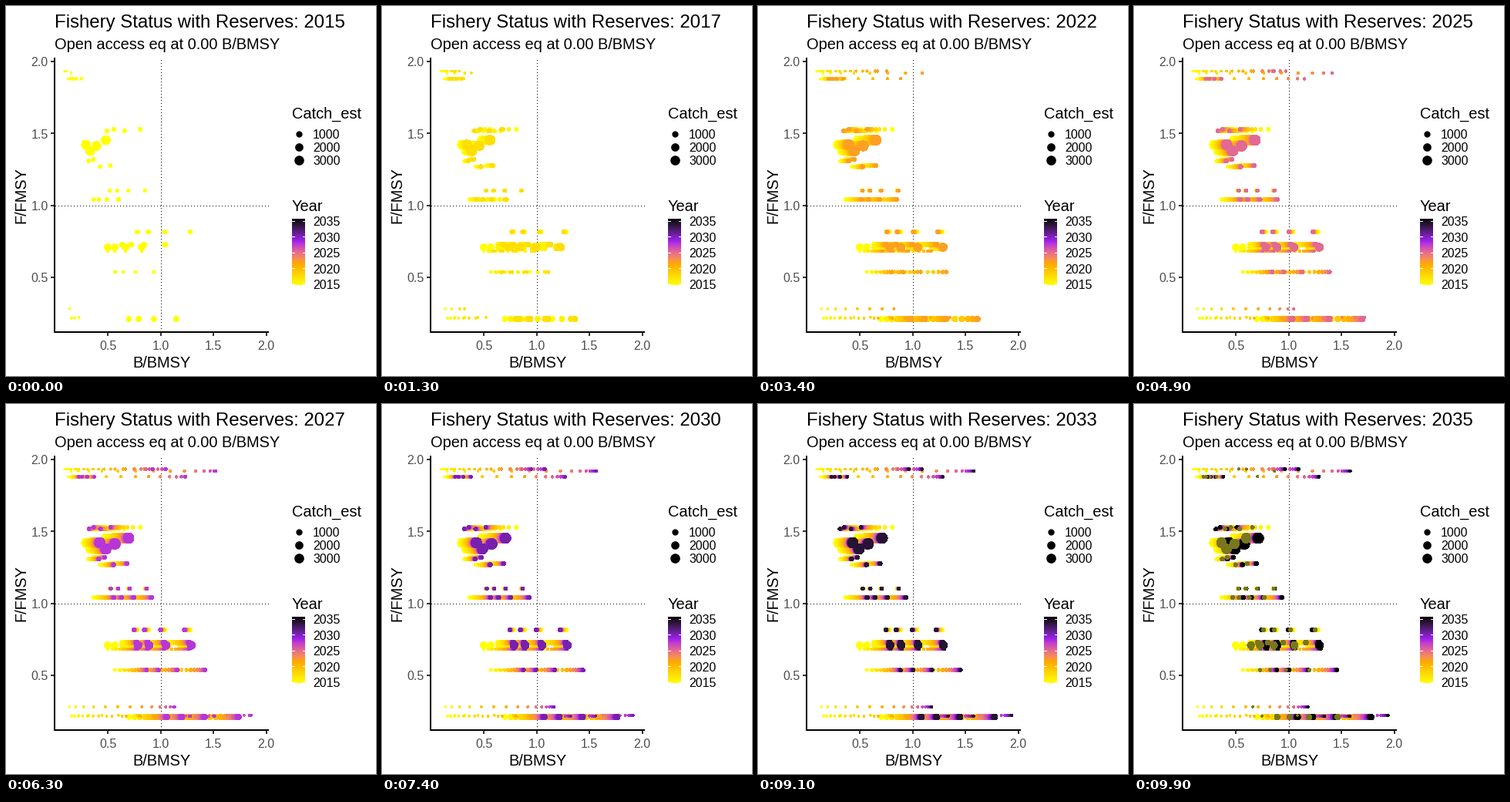
These frames come from a looping animation (480x480 px, 10 s). A matplotlib script:

```python
import numpy as np
import matplotlib.pyplot as plt
from matplotlib.animation import FuncAnimation

plt.rcParams["font.family"] = ["Liberation Sans", "DejaVu Sans"]

SIZE, DPI = 480, 100
PT = 72 / DPI  # points per pixel
FRAMES, INTERVAL = 100, 100
YEARS = np.arange(2015, 2036)
STARTS = [0] + list(range(4, 85, 5)) + [88, 92, 96]  # first frame of each year
MAX_CATCH = 4300
PATCH = np.arange(4)
SPREAD = np.exp(.105 * PATCH + .02 * PATCH ** 2)  # biomass of the patches of one stock

RGB_XYZ = np.array([[.4124, .3576, .1805], [.2126, .7152, .0722], [.0193, .1192, .9505]])
WHITE = RGB_XYZ.sum(axis=1)


def to_lab(rgb):
    rgb = np.asarray(rgb, float)
    lin = np.where(rgb > .04045, ((rgb + .055) / 1.055) ** 2.4, rgb / 12.92)
    t = lin @ RGB_XYZ.T / WHITE
    f = np.where(t > .008856, np.cbrt(t), 7.787 * t + 16 / 116)
    x, y, z = f.T
    return np.stack([116 * y - 16, 500 * (x - y), 200 * (y - z)], axis=-1)


def to_rgb(lab):
    l, a, b = np.asarray(lab).T
    y = (l + 16) / 116
    f = np.stack([y + a / 500, y, y - b / 200], axis=-1)
    t = np.where(f > .2069, f ** 3, (f - 16 / 116) / 7.787)
    lin = np.clip(t * WHITE @ np.linalg.inv(RGB_XYZ).T, 0, 1)
    return np.clip(np.where(lin > .0031308, 1.055 * lin ** (1 / 2.4) - .055, 12.92 * lin), 0, 1)


STOPS = to_lab(np.array([[255, 255, 0], [255, 165, 0], [160, 32, 240], [0, 0, 0]]) / 255)


def year_lab(year):
    at = np.linspace(2015, 2035, 4)
    return np.stack([np.interp(year, at, STOPS[:, i]) for i in range(3)], axis=-1)


def dot_size(catch):
    """Dot diameter in pixels, area scaled."""
    return 2.4 + 12.2 * np.sqrt(np.minimum(catch, MAX_CATCH) / MAX_CATCH)


def px(b):
    return 63 + 137 * b


def py(f):
    return 444.5 - 186.5 * f


def stock(f, b0, gain, catch, rate=None):
    """Logistic path of four patches towards gain * b0 at constant F/FMSY."""
    rate = rate or .2 * gain ** .33
    t = np.arange(len(YEARS))[:, None]
    start = b0 * SPREAD
    share = 1 / (1 + (1 / gain - 1 + gain - 1 / gain) * np.exp(-rate * t) * np.ones(4))
    share = share / share[-1] if gain == 1 else share
    return px(gain * start * share), py(np.resize(f, 4)), dot_size(catch * share)


STOCKS = [
    stock((1.933, 1.933, 1.88, 1.92), .093, 10.4, 30),
    stock(1.88, .152, 1.55, 45),
    stock((1.517, 1.528), .493, .62, 120),
    stock((1.421, 1.378, 1.413, 1.453), .294, 1.49, 3700),
    stock((1.308, 1.319, 1.268, 1.276), .32, 1.33, 250),
    stock(1.102, .52, 1.02, 130),
    stock(1.04, .367, 1.57, 250),
    stock(.815, .78, .955, 250),
    stock(.681, .5, 1.6, 60),
    stock(.7265, .635, 1.24, 600),
    stock(.708, .5, 1.575, 1800, rate=1),
    stock(.536, .57, 1.57, 110),
    stock((.28, .215, .215, .22), .138, 8.6, 8),
    stock(.209, .7, 1.56, 850),
]
X, Y, D = (np.hstack(part) for part in zip(*STOCKS))
LAB = year_lab(YEARS)

fig = plt.figure(figsize=(SIZE / DPI, SIZE / DPI), dpi=DPI, facecolor="white")
ax = fig.add_axes([0, 0, 1, 1])
ax.set_axis_off()


def label(x, y, s, size, **kw):
    return ax.text(x, y, s, fontsize=size * PT, va="baseline", **kw)


def line(x, y, width=2, color="black", **kw):
    ax.plot(x, y, color=color, lw=width * PT, antialiased=False,
            solid_capstyle="butt", dash_capstyle="butt", **kw)


def draw_axes():
    line([200, 200], [421.5, 66.5], 1, ls=(0, (1, 3)), zorder=1)
    line([63.5, 340.5], [258, 258], 1, ls=(0, (1, 3)), zorder=1)
    line([62.5, 62.5], [66.5, 423.5], zorder=4)
    line([61.5, 340.5], [422.5, 422.5], zorder=4)
    for v in (.5, 1, 1.5, 2):
        line([px(v)] * 2, [423.5, 427.5], color="#333333")
        line([57.5, 61.5], [py(v)] * 2, color="#333333")
        label(px(v), 445.5, f"{v:.1f}", 16, ha="center", color="#4d4d4d")
        label(54, py(v) + 6.5, f"{v:.1f}", 16, ha="right", color="#4d4d4d")
    label(201.5, 468.5, "B/BMSY", 20, ha="center")
    label(25, 245, "F/FMSY", 20, ha="center", rotation=90, rotation_mode="anchor")
    label(62.5, 55.5, "Open access eq at 0.00 B/BMSY", 20)


def draw_legends():
    label(370.5, 145.5, "Catch_est", 20)
    for i, catch in enumerate((1000, 2000, 3000)):
        y = 165.3 + 17.2 * i
        ax.scatter([379.3], [y], s=(dot_size(catch) * PT) ** 2, c="black",
                   linewidths=0, antialiased=False)
        label(397.5, y + 6.3, str(catch), 16)
    label(370.5, 265.5, "Year", 20)
    bar = to_rgb(year_lab(np.linspace(2035, 2015, 86)))[:, None, :]
    ax.imshow(bar, extent=(370.5, 387.5, 361.5, 275.5), aspect="auto", interpolation="nearest")
    for i in range(5):
        y = 278 + 20.5 * i
        line([370.5, 373.5], [y, y], 1, "white")
        line([384.5, 387.5], [y, y], 1, "white")
        label(397.5, y + 6.6, str(2035 - 5 * i), 16)


draw_axes()
draw_legends()
title = label(62.5, 27.5, "", 24)
dots = ax.scatter([], [], linewidths=0, antialiased=False, zorder=3)
ax.set_xlim(-.5, SIZE - .5)
ax.set_ylim(SIZE - .5, -.5)


def update(n):
    k = max(i for i, s in enumerate(STARTS) if s <= n)
    moving = n + 1 in STARTS or n == FRAMES - 1
    nxt = (k + 1) % len(YEARS) if moving else k
    past = k + 1 if moving else k
    # earlier years stay as a trail below the current, possibly halfway, dots
    xs, ds, labs = (np.vstack([v[:past], (v[k] + v[nxt]) / 2]) for v in (X, D, LAB))
    dots.set_offsets(np.column_stack([xs.ravel(), np.tile(Y, past + 1)]))
    dots.set_sizes((ds.ravel() * PT) ** 2)
    dots.set_facecolors(np.repeat(to_rgb(labs), len(Y), axis=0))
    title.set_text(f"Fishery Status with Reserves: {YEARS[k]}")
    return dots, title


anim = FuncAnimation(fig, update, frames=FRAMES, interval=INTERVAL, repeat=True, repeat_delay=0)
plt.show()
```
